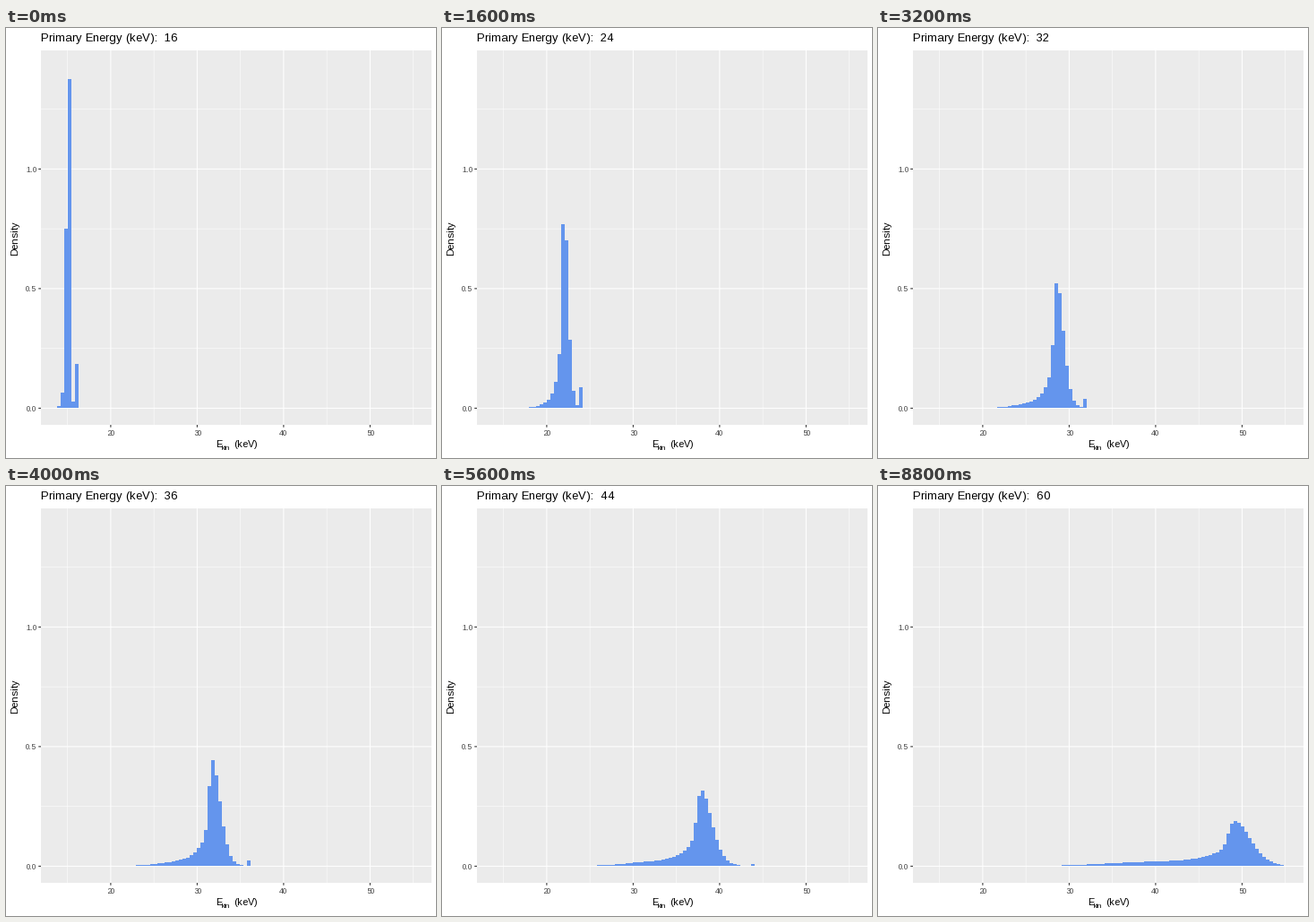
Animation of 480x480 px, one loop 9000 ms. Source, as a matplotlib script:

```python
import numpy as np
import matplotlib.pyplot as plt
from matplotlib.animation import FuncAnimation
from matplotlib.patches import Rectangle

SIZE, DPI = 480, 72
LEFT, RIGHT, TOP, BOTTOM = 39, 475, 25, 443
BASE, UNIT = 424, 267          # bar foot and pixels per density unit
BIN, FINE = 4, 40              # bin width in pixels, samples per bin
EDGES = np.arange(57, 454, BIN)
TOTAL = 642                    # summed bar heights of a whole spectrum
ENERGIES = range(16, 61)

plt.rcParams.update({"font.family": "Liberation Sans",
                     "text.hinting": "force_autohint",
                     "text.hinting_factor": 1})


def x_px(energy):
    return 116.9 + 9.65 * (energy - 20)


def y_px(density):
    return BASE + 0.4 - UNIT * density


def sigmoid(v):
    return 1 / (1 + np.exp(-v))


def spectrum(x, energy):
    """Scattered part: steep rise, rounded fall and a long tail to the left."""
    loss = 60 - energy
    mode = 399 - 6.44 * loss - 0.024 * loss ** 2
    width = 0.41 * (energy - 12)
    height = 52 * (60 / energy) ** 1.72
    u = (x - mode) / width
    left, right = np.minimum(u, 0), np.maximum(u, 0)
    rise = sigmoid((u + 0.4) / 0.11)
    fall = np.exp(-0.693 * right ** 1.7)
    near = 0.52 * height * np.exp(left / 1.1)
    far = 5 * (1 - (15 / energy) ** 4) * sigmoid(0.9 * (u + 4.1 + energy / 18))
    return rise * height * fall + (1 - rise) * (near + far)


def bar_heights(energy):
    x = EDGES[0] + (np.arange((len(EDGES) - 1) * FINE) + 0.5) * BIN / FINE
    h = spectrum(x, energy).reshape(-1, FINE).mean(axis=1)
    # Unscattered electrons keep the full energy and fill one bin.
    gain = energy - 16
    elastic = 49 * np.exp(-0.09 * gain - 0.00085 * gain ** 2)
    h *= (TOTAL - elastic) / h.sum()
    peak = int((x_px(energy) - EDGES[0]) // BIN)
    if peak < len(h):
        h[peak] += elastic
    return np.floor(h + 0.5)


fig = plt.figure(figsize=(SIZE / DPI, SIZE / DPI), dpi=DPI, facecolor="white")
ax = fig.add_axes([0, 0, 1, 1])
ax.axis("off")


def line(xs, ys, color, width, z):
    ax.plot(xs, ys, color=color, lw=width, zorder=z, snap=False,
            solid_capstyle="butt")


def label(x, y, text, size, color="black", **kw):
    return ax.text(x, y, text, fontsize=size, color=color, va="baseline", **kw)


ax.add_patch(Rectangle((LEFT, TOP), RIGHT - LEFT, BOTTOM - TOP,
                       fc="#EBEBEB", lw=0, zorder=0))

for e in range(15, 56, 5):
    major = e % 10 == 0
    line([x_px(e)] * 2, [TOP, BOTTOM], "white", 1.07 if major else 0.53, 1)
    if major:
        line([x_px(e)] * 2, [BOTTOM, BOTTOM + 2.74], "#333333", 1.07, 2)
        label(x_px(e), 455, str(e), 9, "#4D4D4D", ha="center")
for k in range(6):
    major, y = k % 2 == 0, y_px(k / 4)
    line([LEFT, RIGHT], [y] * 2, "white", 1.07 if major else 0.53, 1)
    if major:
        line([LEFT - 2.74, LEFT], [y] * 2, "#333333", 1.07, 2)
        label(34.3, y + 3.2, f"{k / 4:.1f}", 9, "#4D4D4D", ha="right")

label(234, 468, "E", 11)
label(241, 471, "kin", 8)
label(254, 468, "(keV)", 11)
label(13, 234.5, "Density", 11, rotation=90, ha="center",
      rotation_mode="anchor")
title = label(39, 15, "", 13)

bars = ax.bar(EDGES[:-1], 0, BIN, bottom=BASE, align="edge", color="#6495ED",
              linewidth=0, antialiased=False, zorder=3)
ax.set_xlim(0, SIZE)
ax.set_ylim(SIZE, 0)


def update(i):
    energy = ENERGIES[i]
    title.set_text(f"Primary Energy (keV):  {energy}")
    for bar, h in zip(bars, bar_heights(energy)):
        bar.set_y(BASE - h)
        bar.set_height(h)
        bar.set_visible(h > 0)
    return [title, *bars]


anim = FuncAnimation(fig, update, frames=len(ENERGIES), interval=200,
                     repeat=True, repeat_delay=0)
plt.show()
```
